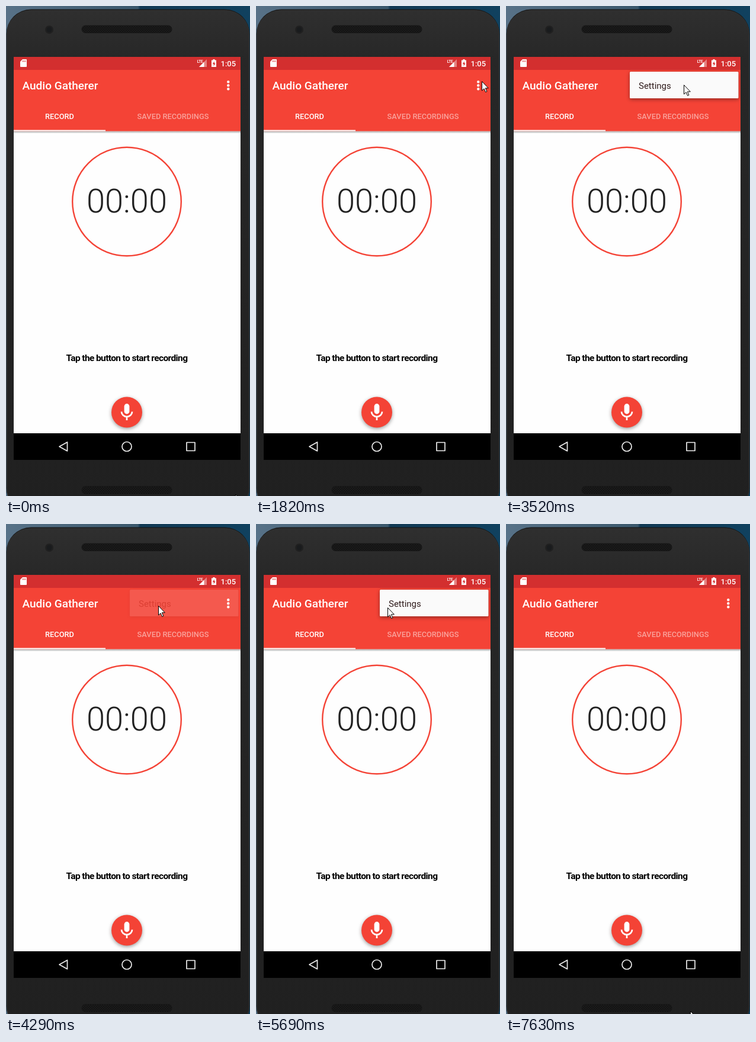
Write an HTML page that moves like this. It is 412 px wide and 828 px high and loops after 8000 ms.

```html
<!DOCTYPE html>
<html lang="en">
<head>
<meta charset="utf-8">
<title>Recorder screen</title>
<style>
  html, body { margin: 0; width: 100%; height: 100%; overflow: hidden; background: #1d3242; }
  svg { display: block; width: 412px; height: 828px; }
  text { font-family: Roboto, sans-serif; }
  .mid { font-weight: 500; fill: #fff; }
  .shadow { filter: drop-shadow(0 2px 3px rgba(0, 0, 0, .4)); }
</style>
</head>
<body>
<svg viewBox="0 0 412 828">
  <defs>
    <linearGradient id="desk">
      <stop offset="0" stop-color="#587288"/>
      <stop offset=".54" stop-color="#3b586c"/>
      <stop offset=".55" stop-color="#123a55"/>
      <stop offset="1" stop-color="#10415f"/>
    </linearGradient>
    <linearGradient id="body" x2="0" y2="1">
      <stop offset="0" stop-color="#2f2f2f"/>
      <stop offset=".1" stop-color="#272727"/>
      <stop offset="1" stop-color="#202020"/>
    </linearGradient>
    <linearGradient id="fall" x2="0" y2="1">
      <stop offset="0" stop-opacity=".34"/>
      <stop offset="1" stop-opacity="0"/>
    </linearGradient>
    <pattern id="mesh" width="4" height="4" patternUnits="userSpaceOnUse">
      <rect width="4" height="4" fill="#131313"/>
      <circle cx="1" cy="1" r=".8" fill="#242424"/>
      <circle cx="3" cy="3" r=".8" fill="#242424"/>
    </pattern>
    <clipPath id="screen"><rect x="13" y="86" width="383" height="681"/></clipPath>
  </defs>

  <!-- desk and phone -->
  <rect width="412" height="828" fill="url(#desk)"/>
  <rect x=".5" y="5.5" width="411" height="851" rx="42" fill="#1a1a1a"/>
  <rect x="1.5" y="7.5" width="409" height="847" rx="40" fill="url(#body)" stroke="#333"/>
  <rect x="128" y="33" width="152" height="12.5" rx="6" fill="url(#mesh)" stroke="#181818"/>
  <rect x="128" y="811.5" width="152" height="13" rx="6" fill="url(#mesh)" stroke="#181818"/>
  <circle cx="73" cy="40" r="7" fill="#202020"/>
  <circle cx="73" cy="40" r="4.5" fill="#191b1d"/>

  <!-- content -->
  <rect x="13" y="86" width="383" height="681" fill="#fefefe"/>
  <rect x="13" y="211.5" width="383" height="4" fill="url(#fall)"/>
  <rect x="13" y="108" width="383" height="103.5" fill="#f44336"/>
  <rect x="13" y="86" width="383" height="22" fill="#d32f2f"/>
  <rect x="13" y="209.5" width="155" height="2" fill="#fff"/>
  <rect x="13" y="722" width="383" height="45"/>

  <!-- status icons -->
  <path d="M28 90h6q1 0 1 1v11q0 1-1 1h-9q-1 0-1-1v-8z" fill="#fff"/>
  <path d="M28.5 92v2.5M30.7 92v2.5M32.9 92v2.5" stroke="#d32f2f"/>
  <path d="M339 90v13h-13z" fill="#fff" opacity=".4"/>
  <path d="M334.5 94.5v8.5H326z" fill="#fff"/>
  <text class="mid" x="322.5" y="96" font-size="7" letter-spacing="-.5">LTE</text>
  <path d="M349.5 90h3v1.5h2.5V103h-8V91.5h2.5z" fill="#fff"/>
  <path d="M351.8 93.5l-3 4.5h1.9v3.5l3-4.7h-1.9z" fill="#d32f2f"/>
  <text class="mid" x="362.5" y="102" font-size="13">1:05</text>

  <!-- app bar -->
  <text class="mid" x="27.5" y="141" font-size="19">Audio Gatherer</text>
  <text class="mid" x="90.5" y="191" font-size="12.8" text-anchor="middle">RECORD</text>
  <text class="mid" x="282" y="191" font-size="12.8" text-anchor="middle" opacity=".5">SAVED RECORDINGS</text>
  <path d="M375.3 128.3h0m0 6h0m0 6h0" stroke="#fff" stroke-width="4.4" stroke-linecap="round"/>

  <!-- recorder -->
  <circle cx="204" cy="330.5" r="91.8" fill="none" stroke="#f44336" stroke-width="2.4"/>
  <text x="204" y="348.5" font-size="56" font-weight="300" fill="#212121" text-anchor="middle">00:00</text>
  <text x="204" y="600" font-size="15.5" font-weight="700" letter-spacing="-.62" text-anchor="middle">Tap the button to start recording</text>
  <circle class="shadow" cx="204" cy="686.5" r="26" fill="#f44336"/>
  <g transform="translate(204 686)" fill="none" stroke="#fff" stroke-linecap="round">
    <path d="M0-9.500V-1" stroke-width="8.8"/>
    <path d="M-9-.5a9 8.500 0 0 0 18 0M0 8v6" stroke-width="2.700" stroke-linecap="butt"/>
  </g>

  <!-- navigation -->
  <g fill="none" stroke="#eee" stroke-width="1.7" stroke-linejoin="round">
    <path d="M103.5 737v15L90 744.5z"/>
    <circle cx="204" cy="744.5" r="8"/>
    <rect x="305" y="737.5" width="14" height="14"/>
  </g>

  <!-- moving parts -->
  <g clip-path="url(#screen)">
    <circle id="ripple" cx="376" cy="130" opacity="0"/>
    <g id="menu" class="shadow" opacity="0">
      <rect x="209" y="111" width="183.5" height="45" rx="1.5" fill="#fafafa"/>
      <text x="224" y="140" font-size="15" fill="#301c1c">Settings</text>
    </g>
  </g>
  <path id="cursor" d="M.5.5V16l3.600-3.300 2.500 5.800 2.300-1-2.500-5.700h4.900z" fill="#fff" stroke="#000"/>
</svg>
<script>
  const LOOP = 8000, TICK = 77, LEAD = 28;
  const FADE = 300, PRESS = 380;
  const [cursor, menu, ripple] = ['cursor', 'menu', 'ripple'].map(id => document.getElementById(id));

  // where the hand pauses: arrival, departure, place
  const stops = [
    { from: 0, to: 0, x: 387, y: 825 },
    { from: 900, to: 1050, x: 331, y: 448 },
    { from: 1300, to: 1300, x: 291, y: 300 },
    { from: 1680, to: 1680, x: 400, y: 104 },
    { from: 1850, to: 3440, x: 377, y: 132 },
    { from: 3600, to: 3820, x: 210, y: 134 },
    { from: 3900, to: 4050, x: 196, y: 140 },
    { from: 4750, to: 5170, x: 379, y: 134 },
    { from: 5930, to: 6390, x: 140, y: 145 },
    { from: 7200, to: 7200, x: 258, y: 745 },
    { from: 7630, to: LOOP, x: 316, y: 830 }
  ];
  // each menu visit: button pressed, menu dismissed
  const visits = [{ press: 2200, close: 4020 }, { press: 4890, close: 6360 }];

  const ramp = (t, start, length) => Math.min(1, Math.max(0, (t - start) / length));

  function hand(t) {
    const i = stops.findLastIndex(s => s.from <= t);
    const a = stops[i], b = stops[i + 1] || a;
    const p = a === b ? 0 : ramp(t, a.to, b.from - a.to);
    return [a.x + (b.x - a.x) * p, a.y + (b.y - a.y) * p].map(Math.round);
  }

  function draw(ms) {
    const t = Math.max(0, Math.floor((ms + LEAD) / TICK) * TICK - LEAD);
    const { press, close } = visits.findLast(v => t >= v.press) || visits[0];
    const grow = ramp(t, press + PRESS, FADE), fade = ramp(t, close, FADE);
    const push = ramp(t, press, PRESS), size = .5 + grow / 2;

    cursor.setAttribute('transform', `translate(${hand(t)})`);
    menu.setAttribute('opacity', grow * (1 - fade));
    menu.setAttribute('transform', `translate(392 111) scale(${size}) translate(-392 -111)`);
    ripple.setAttribute('opacity', .06 * Math.sin(Math.PI * push));
    ripple.setAttribute('r', 24 + 12 * push);
  }

  const start = performance.now();
  function frame() {
    draw((performance.now() - start) % LOOP);
    requestAnimationFrame(frame);
  }
  frame();
</script>
</body>
</html>
```
